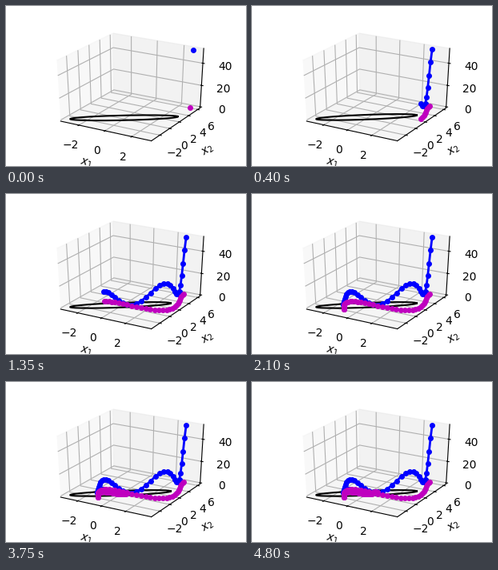
These frames come from a looping animation (300x200 px, 4.95 s). A matplotlib script:

```python
import math

import numpy as np
import matplotlib.pyplot as plt
from matplotlib.animation import FuncAnimation
from mpl_toolkits.mplot3d import Axes3D

STEPS = 97
FRAMES = 99
INTERVAL = 50


class WideAxes(Axes3D):
    """3D axes that fill their rectangle instead of shrinking to a square."""

    def apply_aspect(self, position=None):
        pass


def from_modes(mean, diff):
    """Turn the sum and difference modes into x1 and x2."""
    return mean + diff, mean - diff


def ringing(t, size, decay, speed, phase):
    return size * np.exp(-decay * t) * np.cos(speed * t + phase)


def padded(low, high, margin=0.05):
    """Limits with a data margin plus the small gap before the panes."""
    span = high - low
    pad = margin * span + span * (1 + 2 * margin) / 48
    return low - pad, high + pad


# A slow mode along the diagonal and a fast one across it, both dying out.
t = np.arange(STEPS)
mean = 0.1 + ringing(t, 4.39, 0.0227, 0.0635, 0.199)
diff = ringing(t, 1.63, 0.029, 0.217, -1.172 - math.pi / 2)
x1, x2 = from_modes(mean, diff)
height = 0.79 * mean ** 2 + 16.2 * diff ** 2
floor = np.zeros(STEPS)

angle = np.linspace(0, 2 * np.pi, 200)
ring1, ring2 = from_modes(2.97 * np.cos(angle), 0.4 * np.sin(angle))

fig = plt.figure(figsize=(3, 2), dpi=100)
ax = fig.add_subplot(axes_class=WideAxes)
ax.view_init(elev=30, azim=-60)
ax.set_box_aspect((1, 1, 1), zoom=math.sqrt(3) / 1.8294640721620434)

dots = dict(marker="o", markersize=4, linewidth=2)
ax.plot(ring1, ring2, 0 * angle, "k")
curve, = ax.plot([], [], [], "b", **dots)
shadow, = ax.plot([], [], [], "m", **dots)

ax.set_xlabel("$x_1$")
ax.set_ylabel("$x_2$")
ax.set_zlabel("$E$")
ax.set_xticks([-2, 0, 2])
ax.set_yticks([-2, 0, 2, 4, 6])
ax.set_zticks([0, 20, 40])
ax.set_ylim(*padded(ring2.min(), x2.max()))
ax.set_zlim(*padded(0, height.max(), 0))


def update(frame):
    n = min(frame + 1, STEPS)
    curve.set_data_3d(x1[:n], x2[:n], height[:n])
    shadow.set_data_3d(x1[:n], x2[:n], floor[:n])
    ax.set_xlim(*padded(ring1.min(), max(ring1.max(), x1[:n].max())))
    return curve, shadow


anim = FuncAnimation(fig, update, frames=FRAMES, interval=INTERVAL,
                     init_func=lambda: update(0), repeat=True, repeat_delay=0)
plt.show()
```
